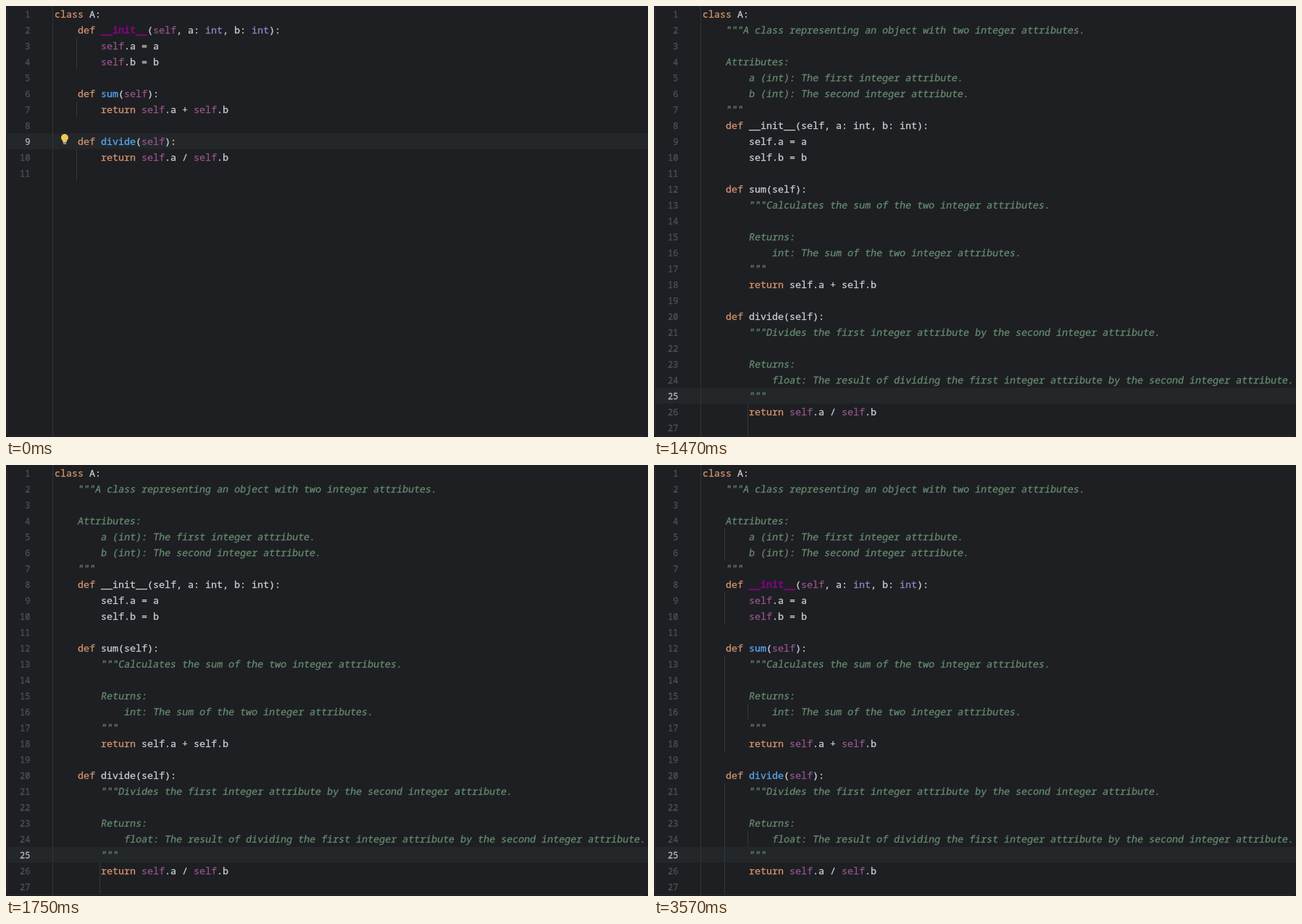
These frames come from a looping animation (886x596 px, 4690 ms). An HTML page with a canvas:

```html
<!DOCTYPE html>
<html lang="en">
<head>
<meta charset="utf-8">
<title>Docstring insertion</title>
<style>
html, body { margin: 0; width: 100%; height: 100%; overflow: hidden; background: #1e1f22; }
canvas { display: block; width: 886px; height: 596px; }
</style>
</head>
<body>
<canvas id="stage"></canvas>
<script>
const W = 886, H = 596, LOOP = 4690;
const ROW = 22, COL = 8, LEFT = 67, BASE = 16;
const FAMILY = '"Noto Sans Mono", "DejaVu Sans Mono", monospace';
const SLANT = 0.16, THICKEN = 0.3;
const COLORS = {
  bg: '#1e1f22', caret: '#23272a', border: '#313438', guide: '#2c3a3a',
  number: '#4b5059', activeNumber: '#b4b6bd',
  plain: '#cbcdd3', keyword: '#d4936f', name: '#56a8f5',
  self: '#94558d', type: '#8888c6', magic: '#78087a', doc: '#648a71'
};

const before = `class A:
    def __init__(self, a: int, b: int):
        self.a = a
        self.b = b

    def sum(self):
        return self.a + self.b

    def divide(self):
        return self.a / self.b
`.split('\n');

const after = `class A:
    """A class representing an object with two integer attributes.

    Attributes:
        a (int): The first integer attribute.
        b (int): The second integer attribute.
    """
    def __init__(self, a: int, b: int):
        self.a = a
        self.b = b

    def sum(self):
        """Calculates the sum of the two integer attributes.

        Returns:
            int: The sum of the two integer attributes.
        """
        return self.a + self.b

    def divide(self):
        """Divides the first integer attribute by the second integer attribute.

        Returns:
            float: The result of dividing the first integer attribute by the second integer attribute.
        """
        return self.a / self.b
`.split('\n');

// Guides: [indent column, first line, last line]. Lines from richFrom on get full highlighting.
const scenes = [
  { until: 1470, lines: before, active: 9, richFrom: 1, bulb: true,
    guides: [[4, 3, 4], [4, 7, 7], [4, 10, 11]] },
  { until: 1890, lines: after, active: 25, richFrom: 26,
    guides: [[8, 26, 27]] },
  { until: LOOP, lines: after, active: 25, richFrom: 1,
    guides: [[4, 5, 6], [4, 9, 10], [4, 13, 18], [4, 21, 27], [8, 16, 16], [8, 24, 24]] }
];

const canvas = document.getElementById('stage');
const ctx = canvas.getContext('2d');
const scale = window.devicePixelRatio || 1;
canvas.width = Math.round(W * scale);
canvas.height = Math.round(H * scale);
ctx.scale(scale, scale);

function rect(x, y, w, h, color) {
  ctx.fillStyle = color;
  ctx.fillRect(x, y, w, h);
}

// A hairline outline gives the regular face a medium weight.
function ink(text, x, y, color) {
  ctx.fillStyle = ctx.strokeStyle = color;
  ctx.lineWidth = THICKEN;
  ctx.lineJoin = 'round';
  ctx.fillText(text, x, y);
  ctx.strokeText(text, x, y);
}

function put(text, col, y, kind) {
  ctx.save();
  ctx.translate(LEFT + col * COL, y);
  if (kind === 'doc') ctx.transform(1, 0, -SLANT, 1, -0.6, 0);
  ctx.font = `${kind === 'magic' ? 'bold ' : ''}13.333px ${FAMILY}`;
  ink(text, 0, 0, COLORS[kind]);
  ctx.restore();
}

function kindOf(word, previous, rich) {
  if (/^(class|def|return)$/.test(word)) return 'keyword';
  if (!rich) return 'plain';
  if (word === '__init__') return 'magic';
  if (word === 'self') return 'self';
  if (word === 'int') return 'type';
  return previous === 'def' ? 'name' : 'plain';
}

function drawCode(line, y, rich) {
  let previous = '';
  for (const m of line.matchAll(/\w+|[^\w\s]+/g)) {
    put(m[0], m.index, y, kindOf(m[0], previous, rich));
    previous = m[0];
  }
}

function drawDoc(line, y) {
  for (const m of line.matchAll(/\S+/g)) put(m[0], m.index, y, 'doc');
}

function drawBulb(x, y) {
  ctx.fillStyle = '#f2c55c';
  ctx.beginPath();
  ctx.arc(x, y, 5, 0.72 * Math.PI, 0.28 * Math.PI);
  ctx.lineTo(x + 2.3, y + 6);
  ctx.lineTo(x - 2.3, y + 6);
  ctx.fill();
  rect(x - 2.5, y + 6.2, 5, 1, '#ced0d6');
  rect(x - 2, y + 8, 4, 1, '#ced0d6');
}

function drawFrame() {
  ctx.lineWidth = 1;
  ctx.strokeStyle = '#292b2e';
  ctx.beginPath();
  ctx.moveTo(1.5, 3);
  ctx.lineTo(1.5, H - 5);
  ctx.quadraticCurveTo(1.5, H - 1.5, 5, H - 1.5);
  ctx.lineTo(W - 4, H - 1.5);
  ctx.stroke();
  rect(0, 0, 1, H, '#191a1c');
  rect(0, H - 1, W, 1, '#191a1c');
}

function draw(scene) {
  rect(0, 0, W, H, COLORS.bg);
  drawFrame();
  rect(2, (scene.active - 1) * ROW, W - 2, ROW, COLORS.caret);
  rect(64, 0, 1, H, COLORS.border);
  for (const [col, first, last] of scene.guides) {
    rect(65 + col * COL, (first - 1) * ROW, 1, (last - first + 1) * ROW, COLORS.guide);
  }

  let inDoc = false;
  scene.lines.forEach((line, i) => {
    const n = i + 1, y = i * ROW + BASE;
    ctx.font = `12px ${FAMILY}`;
    ctx.textAlign = 'right';
    ink(n, 33.5, y, n === scene.active ? COLORS.activeNumber : COLORS.number);
    ctx.textAlign = 'left';

    const quote = line.includes('"""');
    if (quote || inDoc) drawDoc(line, y);
    else drawCode(line, y, n >= scene.richFrom);
    if (quote) inDoc = !inDoc;
  });
  if (scene.bulb) drawBulb(81, 182);
}

const start = performance.now();

function tick() {
  const t = (performance.now() - start) % LOOP;
  draw(scenes.find(s => t < s.until));
  requestAnimationFrame(tick);
}
tick();
</script>
</body>
</html>
```
